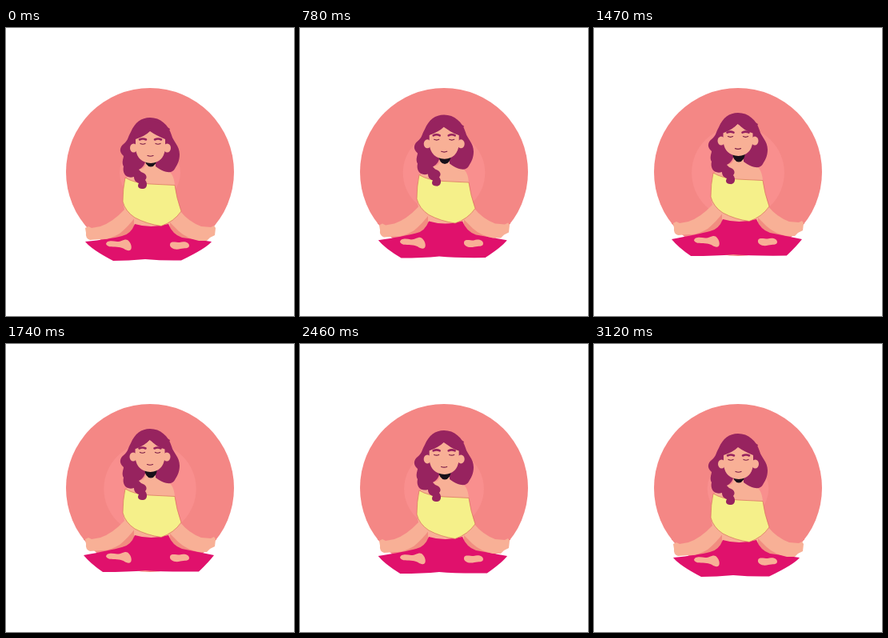
An HTML page for the animation above (3150 ms loop, 360x360 px).

```html
<!DOCTYPE html>
<html lang="en">
<meta charset="utf-8">
<title>Meditation</title>
<style>
html, body { margin: 0; height: 100%; overflow: hidden; background: #fff }
svg { display: block; width: 100vw; height: 100vh }
.skin { fill: #f8b096 }
.hair { fill: #97235f }
.line { fill: none; stroke-linecap: round }
</style>
<svg viewBox="0 0 360 360">
  <circle cx="180" cy="180" r="105" fill="#f48785"/>
  <circle id="aura" cx="180" cy="181" r="38" fill="#f98f8e"/>
  <g id="body">
    <path fill="#f18d80" d="M160 234L146 250L130 263H232L210 238Z"/>
    <path class="skin" d="M160 230H205V252H160Z"/>
    <path id="pants" fill="#e0116c"/>
    <g id="feet" class="skin">
      <path d="M125 270C126 265 133 266 139 267C145 267 148 263 152 265C156 268 158 274 156 277C152 281 147 274 141 274C135 273 127 275 125 270Z"/>
      <path d="M205 270C206 266 212 268 217 268C223 266 229 268 229 272C229 276 223 275 218 276C211 278 204 275 205 270Z"/>
    </g>
    <path class="skin" d="M146 217L162 236Q152 249 142 257Q128 265 119 264L105 265Q99 263 100 256L99 250L103 248L107 250L118 248Q133 243 148 227Z"/>
    <path class="skin" d="M217 228Q228 242 244 248L256 249L260 247L262 250L261 259L255 262L251 266L241 266Q226 263 216 254L202 240Z"/>
    <path class="skin" d="M175 160H187V172Q189 175 199 177Q210 180 211 197L210 203H150Q147 180 164 177Q175 176 175 169Z"/>
    <path fill="#f5f08a" stroke="#d8705e" stroke-width=".7" d="M149 187Q160 194 180 195L211 196.500Q213 212 219 229Q210 242 194 247.500Q176 245 161 237Q149 229 146 217Q146 201 149 187Z"/>
    <path class="hair" d="M180 112C193 112 203 121 207 134C209 142 217 147 217 158C217 166 214 171 211 176C208 182 199 182 187 173L184 165L175 163Q174 173 166 177L169 180C176 182 177 187 174 190C178 195 176 202 170 201C165 201 164 197 166 194C161 192 160 189 160 186C150 189 145 181 147 173C144 168 147 163 147 160C141 155 142 149 147 145C153 140 152 137 156 130C161 118 169 112 180 112Z"/>
    <path class="skin" d="M175 160H187V177H171Q175 172 175 169Z"/>
    <path fill="#171019" d="M173 162H189Q188 173 181 173.500Q174 173 173 162Z"/>
    <g id="face">
      <ellipse class="skin" cx="159.500" cy="150" rx="4.500" ry="5.500"/>
      <ellipse class="skin" cx="201.500" cy="150" rx="4.500" ry="5.500"/>
      <path class="skin" d="M162 139Q174 135 180 129Q187 134 199 139V151Q197 168 181 169Q164 168 162 151Z"/>
    </g>
    <path class="hair" d="M180 113L205 126L200 138Q186 134 180 125Q174 133 161 137.500L158 126Z"/>
    <g id="features" class="line">
      <path stroke="#97235f" stroke-width="2.600" d="M167 139.500Q171 137.500 175 139.500M186 139.500Q190 137.500 194 139.500"/>
      <path stroke="#7a1c46" stroke-width="1.200" d="M168 144.500Q171 146 174 144.500M187 144.500Q190 146 193 144.500M177 159.500Q180.500 161 184 159.500"/>
    </g>
  </g>
</svg>
<script>
const LOOP = 3150;
const part = id => document.getElementById(id);
const [aura, body, pants, feet, face, features] =
  ['aura', 'body', 'pants', 'feet', 'face', 'features'].map(part);

const smooth = x => x * x * (3 - 2 * x);
const shift = (el, x, y) => el.setAttribute('transform', `translate(${x} ${y})`);

// Knees spread and the seat flattens as the body rises.
function pantsPath(p) {
  const left = 99 - 2 * p, right = 257 + 3 * p, knee = 267 + 3 * p;
  const seatL = 134 - 13 * p, seatR = 219 + 22 * p;
  return `M${left} ${knee}Q130 264 145 260Q156 258 161 245Q181 251 203 245Q208 258 220 262
    L${right} ${knee}Q${right - 6} ${knee + 8} ${seatR} 290.500
    Q196 291 174 289Q153 291 ${seatL} 291Q${left + 8} ${knee + 10} ${left} ${knee}Z`;
}

function draw(now) {
  const u = now % LOOP / LOOP;
  const wave = Math.sin(Math.PI * u);
  // The body follows the breath a little late.
  const p = smooth(Math.sin(Math.PI * (u - .06 * wave * wave)) ** 1.3);
  aura.setAttribute('r', 38 + 20 * wave ** 1.15);
  pants.setAttribute('d', pantsPath(p));
  shift(body, 0, -6 * p);
  shift(feet, 0, 1.5 * p);
  shift(face, -.5 * p, -3 * p);
  shift(features, -.5 * p, -3 * p);
  requestAnimationFrame(draw);
}
draw(0);
</script>
</html>
```
